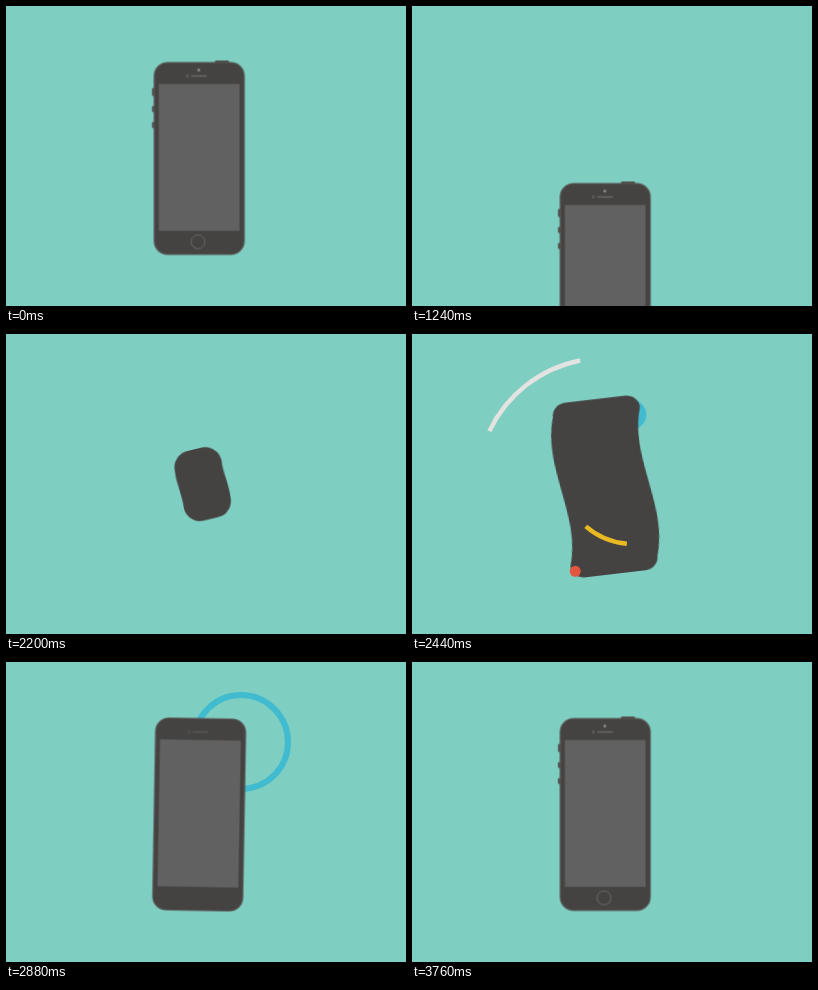
These frames come from a looping animation (400x300 px, 3960 ms). An HTML page:

```html
<!DOCTYPE html>
<html lang="en">
<head>
<meta charset="utf-8">
<title>Phone loop</title>
<style>
  html, body { margin: 0; width: 100%; height: 100%; overflow: hidden; background: #7ecec1; }
  svg { display: block; width: 100%; height: 100%; }
  .line { fill: none; stroke: #6b6967; }
  .key { fill: #4d4b49; }
  .arc { fill: none; stroke-width: 4.5; }
</style>
</head>
<body>
<svg viewBox="0 0 400 300">
  <clipPath id="glass"><rect x="-40.4" y="-74.5" width="80.8" height="147"/></clipPath>

  <circle id="ring" fill="none" stroke="#41bbd0"/>

  <g id="phone">
    <rect id="key1" class="key" x="-47.2" y="-70.5" width="4" height="8" rx="1"/>
    <rect id="key2" class="key" x="-47.2" y="-52.5" width="4" height="6" rx="1"/>
    <rect id="key3" class="key" x="-47.2" y="-36.5" width="4" height="6" rx="1"/>
    <rect id="power" class="key" x="15.8" y="-98" width="14" height="4" rx="1"/>
    <path id="body" fill="#454341" stroke-width="1.2"/>
    <g id="screen">
      <rect x="-40.4" y="-74.5" width="80.8" height="147" fill="#616161"/>
      <g clip-path="url(#glass)">
        <path id="shine" d="M-40.4-49.5 40.4-93.5v25L-40.4-24.5z" fill="#fffff0"/>
      </g>
    </g>
    <circle id="home" class="line" cx="-1.2" cy="83.4" r="6.9"/>
    <circle id="camera" cx="-.4" cy="-88.6" r="1.5" fill="#8a8886"/>
    <g id="speaker">
      <circle class="line" cx="-11.9" cy="-82.5" r="1.1"/>
      <path class="line" d="M-8-82.5H7.6" stroke-width="1.5"/>
    </g>
    <path id="glint" d="M0-20Q1-1 21 0Q1 1 0 20Q-1 1-21 0Q-1-1 0-20z" fill="#fffff0"/>
  </g>

  <circle id="white" class="arc" cx="193" cy="152" stroke="#e3e3e1" pathLength="360"/>
  <circle id="yellow" class="arc" cx="221" cy="138" r="72" stroke="#e9b923" pathLength="360"/>
  <circle id="red" fill="#e2563f"/>
</svg>

<script>
const LOOP = 3960, STEP = 40, BIRTH = 1880;
const EASE = 'ease-in-out', FALL = 'cubic-bezier(.333,0,.667,.333)';
const tracks = [];

// Each key is [time in ms, properties, easing to the next key].
function track(id, keys) {
  const full = [[0, keys[0][1]], ...keys, [LOOP, keys.at(-1)[1]]];
  const frames = full.map(([ms, props, easing = 'linear']) =>
    ({ ...props, easing, offset: ms / LOOP }));
  const anim = document.getElementById(id).animate(frames, { duration: LOOP, iterations: Infinity });
  anim.pause();
  tracks.push(anim);
}

const pose = (x, y, turn = 0, sx = 1, sy = sx) =>
  ({ transform: `translate(${x}px,${y}px) rotate(${turn}deg) scale(${sx},${sy})` });
const centre = (turn, sx, sy) => pose(193.2, 152.5, turn, sx, sy);

// Rounded box with half sizes w and h whose sides bend into an S.
function shape(w, h, r, bend = 0) {
  const x = w - r, y = h - r, k = y / 3, corner = `A${r} ${r} 0 0 0 `;
  return `path("M${-w} ${-y} C${-w - bend} ${-k} ${-w + bend} ${k} ${-w} ${y} ` +
    `${corner}${-x} ${h} L${x} ${h} ${corner}${w} ${y} ` +
    `C${w + bend} ${k} ${w - bend} ${-k} ${w} ${-y} ` +
    `${corner}${x} ${-h} L${-x} ${-h} ${corner}${-w} ${-y} Z")`;
}
const body = (bend, stroke = '#454341') => ({ d: shape(45, 96, 13.5, bend), stroke });
const blob = r => ({ d: shape(r, r, r), stroke: '#454341' });
const RIM = '#5a5856';

track('phone', [
  [880, pose(193.2, 152.5), 'ease-out'],
  [980, pose(193.2, 139.5), FALL],
  [1240, pose(193.2, 273.5)],
  [1400, pose(193.2, 430)],
  [BIRTH, pose(193.2, 430)],
  [BIRTH, pose(200, 147), EASE],
  [2160, pose(197, 150, -14), EASE],
  [2360, centre(-10, .93, .95), EASE],
  [2440, centre(-6.7, .96, .91), EASE],
  [2600, centre(4, 1.02, .98), EASE],
  [2740, centre(-2, 1, 1.01), EASE],
  [2880, centre(1), EASE],
  [2980, centre(0)]
]);

track('body', [
  [BIRTH, body(0, RIM)],
  [BIRTH, blob(7), EASE],
  [2120, blob(17), EASE],
  [2360, body(8), EASE],
  [2440, body(17), EASE],
  [2600, body(-10), EASE],
  [2740, body(4, RIM), EASE],
  [2860, body(0, RIM)]
]);

// Parts that are lost at the fall and come back while the phone is rebuilt.
function comeBack(id, from, to, hidden, shown = { transform: 'none' }) {
  const on = { opacity: 1, ...shown }, off = { opacity: 0, ...hidden };
  track(id, [[BIRTH, on], [BIRTH, off], [from, off, 'ease-out'], [to, on]]);
}
const scale = n => ({ transform: `scale(${n})` });
const shift = (x, y) => ({ transform: `translate(${x}px,${y}px)` });

comeBack('screen', 2560, 2800, scale(.3), scale(1));
comeBack('speaker', 2800, 3040, {}, {});
comeBack('camera', 3000, 3120, {}, {});
comeBack('home', 3000, 3200, { r: '0px' }, { r: '6.9px' });
comeBack('power', 3120, 3280, shift(0, 3), shift(0, 0));
comeBack('key1', 3400, 3520, shift(3, 0), shift(0, 0));
comeBack('key2', 3460, 3600, shift(3, 0), shift(0, 0));
comeBack('key3', 3520, 3680, shift(3, 0), shift(0, 0));

track('shine', [[3220, shift(0, -58.1)], [3760, shift(0, 166)]]);

const star = (size, turn) =>
  ({ transform: `translate(-10.7px,-83.5px) rotate(${turn}deg) scale(${size})` });
track('glint', [[420, star(0, -20), 'ease-out'], [500, star(1, 0), 'ease-in'], [600, star(0, 20)]]);

const sweep = (start, length, more) =>
  ({ strokeDasharray: `${length} 360`, strokeDashoffset: -start, ...more });
track('white', [
  [2320, sweep(201, 0, { r: '128px' })],
  [2400, sweep(201.5, 29, { r: '128px' })],
  [2440, sweep(205.4, 53.4, { r: '128px' })],
  [2600, sweep(265, 55, { r: '137px' })],
  [2760, sweep(326, 0, { r: '130px' })]
]);
track('yellow', [
  [2280, sweep(37, 0)],
  [2400, sweep(60, 46)],
  [2440, sweep(95, 36)],
  [2520, sweep(160, 0)]
]);

const dot = (x, y, r, strokeWidth = 0) =>
  ({ cx: `${x}px`, cy: `${y}px`, r: `${r}px`, strokeWidth: `${strokeWidth}px` });
track('red', [
  [2320, dot(180, 190, 0)],
  [2440, dot(163.3, 237.3, 5.5), 'ease-out'],
  [2520, dot(154, 259, 5.5)],
  [2640, dot(151, 262, 0)]
]);
track('ring', [
  [2360, dot(208, 92, 0, 0)],
  [2440, dot(219.3, 80.5, 7.5, 15)],
  [2600, dot(232, 80, 24, 18)],
  [2880, dot(235, 80, 47, 6)],
  [3080, dot(235, 80, 61, 0)]
]);

const start = performance.now();
function draw() {
  const t = Math.floor((performance.now() - start) / STEP) * STEP % LOOP;
  for (const anim of tracks) anim.currentTime = t;
  requestAnimationFrame(draw);
}
draw();
</script>
</body>
</html>
```
